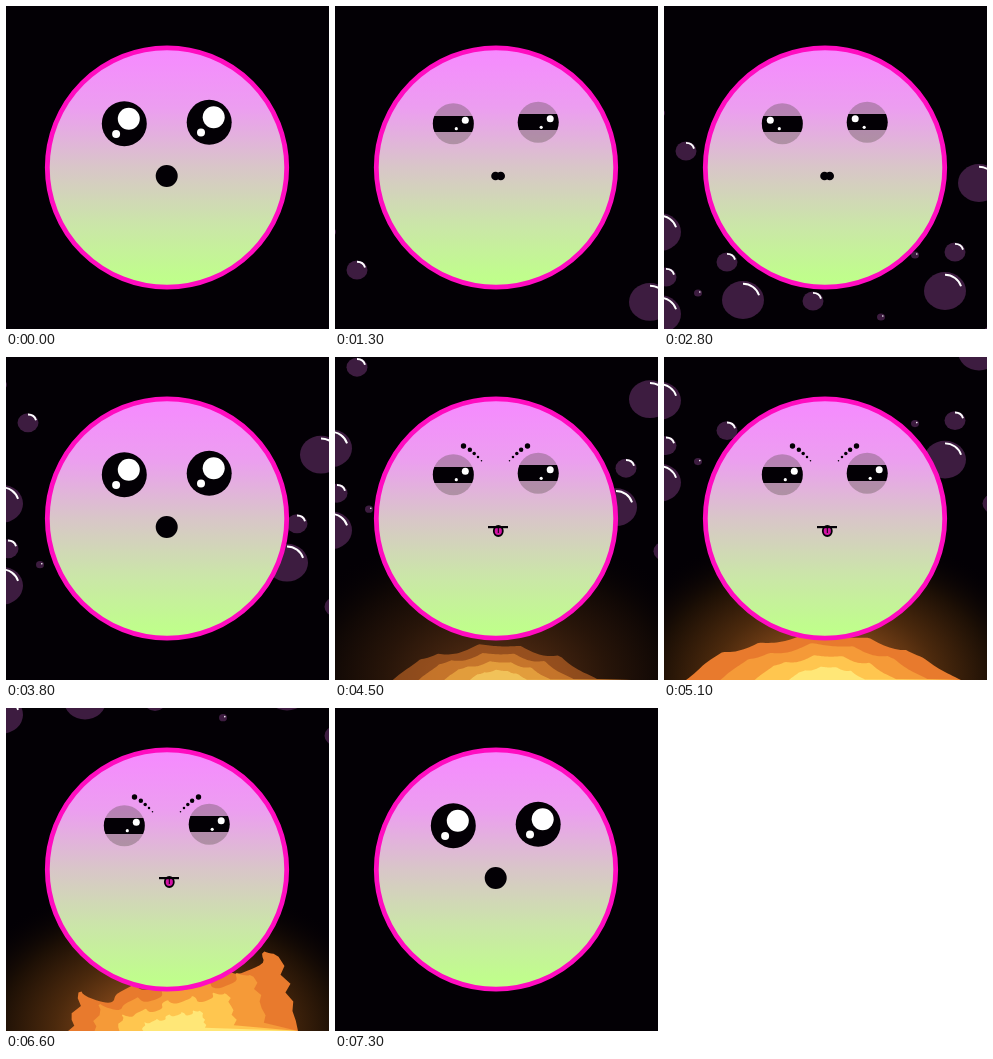
Write an HTML page with a canvas that moves like this. It is 323 px wide and 323 px high and loops after 7.4 s.

```html
<!DOCTYPE html>
<html lang="en">
<head>
<meta charset="utf-8">
<title>Bubbles and fire</title>
<style>
  html, body { margin: 0; width: 100%; height: 100%; overflow: hidden; background: #030005; }
  canvas { display: block; width: 100vmin; height: 100vmin; }
</style>
</head>
<body>
<canvas id="stage" width="323" height="323"></canvas>
<script>
const SIZE = 323, LOOP = 7400, STEP = 100;
const INK = '#030005', PINK = '#ff0cc0', WHITE = '#fff';
const ctx = document.getElementById('stage').getContext('2d');

const RISE = 0.0793; // px per ms
// Bubble centres at 2800 ms, grouped by radius
const bubbleGroups = [
  { r: 21, at: [[315, 177], [-4, 226], [281, 285], [79, 294], [-4, 308]] },
  { r: 10.5, at: [[22, 145], [291, 246], [63, 256], [2, 271], [149, 295], [329, 329]] },
  { r: 4, at: [[-3, 107], [251, 249], [34, 287], [217, 311]] }
];

const clamp = v => Math.max(0, Math.min(1, v));
const mix = (a, b, k) => a + (b - a) * k;

function disc(x, y, r, fill, ry = r) {
  ctx.beginPath();
  ctx.ellipse(x, y, r, ry, 0, 0, Math.PI * 2);
  ctx.fillStyle = fill;
  ctx.fill();
}

function fillStops(gradient, colors) {
  colors.forEach((color, i) => gradient.addColorStop(i / (colors.length - 1), color));
  return gradient;
}

function drawBubble(x, y, r) {
  const ry = r * 0.9;
  disc(x, y, r, '#3d1c40', ry);
  if (r < 5) return disc(x + 1.8, y - 1, 0.8, WHITE);
  ctx.beginPath();
  ctx.ellipse(x, y, r * 0.8, ry * 0.86, 0, -Math.PI / 2, -0.3);
  ctx.strokeStyle = WHITE;
  ctx.lineWidth = 1.9;
  ctx.stroke();
}

function drawBubbles(t) {
  for (const { r, at } of bubbleGroups)
    for (const [x, y] of at) drawBubble(x, y - (t - 2800) * RISE, r);
}

// Flame outline: a low mound that later leans right and grows sharp tongues
function flamePath(t, late, scale) {
  const left = mix(22, 62, late), width = mix(275, 230, late);
  const ramp = mix(5, 12, late), drift = 0.04 * Math.sin((t - 5900) / 120);
  ctx.beginPath();
  ctx.moveTo(left, SIZE);
  for (let u = 0; u <= 1; u += 0.01) {
    const edge = Math.min(1, u * ramp * 1.5, (1 - u) * ramp);
    const tongue = mix(5, 13, late) * (1 - Math.abs(Math.sin(5 * Math.PI * (u - 0.05 + drift))));
    const height = 27 + 60 * late * u ** 3 + 18 * Math.sin(Math.PI * u) ** 4 + tongue;
    const curl = 4 * late * Math.sin(height * 0.3 * edge + t / 150);
    const x = left + width * u + curl;
    ctx.lineTo(mix(165, x, scale), SIZE - height * edge * scale);
  }
  ctx.lineTo(left + width, SIZE);
  ctx.closePath();
}

function drawFire(t) {
  if (t < 4400 || t > 7200) return;
  const power = Math.min(clamp((t - 4200) / 600), clamp((7500 - t) / 900));
  const late = clamp((t - 5300) / 300);

  ctx.save();
  ctx.globalAlpha = power;
  ctx.save();
  ctx.translate(161, SIZE);
  ctx.scale(1.25, 0.85);
  ctx.fillStyle = fillStops(ctx.createRadialGradient(0, 0, 0, 0, 0, 180),
    ['#9a5520', '#84481a', '#4b290d', '#1c0f05', 'rgba(3,0,5,0)']);
  ctx.fillRect(-161, -SIZE, SIZE, SIZE);
  ctx.restore();

  const layers = ['#e87a2d', '#f59a38', '#ffc64f', '#ffe777'];
  layers.forEach((color, i) => {
    flamePath(t + i * 90, late, (1 - i * 0.24) * mix(0.5, 1, power));
    ctx.fillStyle = color;
    ctx.fill();
  });
  ctx.restore();
}

function drawHead() {
  const skin = fillStops(ctx.createLinearGradient(0, 45, 0, 275),
    ['#f68aff', '#ec9ef0', '#d9c5c9', '#cbe5a9', '#bfff8a']);
  disc(161, 161.5, 119.7, skin);
  ctx.strokeStyle = PINK;
  ctx.lineWidth = 4.8;
  ctx.stroke();
}

const eyes = [[118.3, 117.7], [203.2, 116.3]];

function openEyes() {
  for (const [x, y] of eyes) {
    disc(x, y, 22.5, INK);
    disc(x + 4.5, y - 5, 11, WHITE);
    disc(x - 8.2, y + 10.2, 4, WHITE);
  }
}

// side: 1 looks right, -1 looks left
function sleepyEyes(side) {
  for (const [x, y] of eyes) {
    disc(x, y, 20.5, 'rgba(60,60,45,.3)');
    ctx.save();
    ctx.clip();
    ctx.fillStyle = INK;
    ctx.fillRect(x - 21, Math.round(y - 8), 42, 16);
    ctx.restore();
    disc(x + side * 12, y - 3.5, 3.5, WHITE);
    disc(x + side * 3, y + 5, 1.6, WHITE);
  }
}

function smallMouth() {
  for (const x of [160.5, 165.7]) disc(x, 170, 4.3, INK);
}

function drawBrows() {
  for (let i = 0; i < 5; i++) {
    const dx = 18 * (i / 4) ** 0.75;
    for (const x of [128.5 + dx, 192.5 - dx]) disc(x, 89 + 3.7 * i, 2.7 - 0.48 * i, INK);
  }
}

function tongueMouth() {
  disc(163.3, 174, 4.5, '#d314a5', 5);
  ctx.strokeStyle = INK;
  ctx.lineWidth = 1.8;
  ctx.stroke();
  ctx.fillStyle = INK;
  ctx.fillRect(162.8, 171, 1, 5);
  ctx.fillRect(153, 169, 20, 2.2);
}

const moods = {
  surprised() { openEyes(); disc(160.7, 170, 11, INK); },
  lookRight() { sleepyEyes(1); smallMouth(); },
  lookLeft() { sleepyEyes(-1); smallMouth(); },
  cheeky() { sleepyEyes(1); drawBrows(); tongueMouth(); }
};

// Each mood lasts until the given time
const schedule = [
  [900, 'surprised'], [2100, 'lookRight'], [3300, 'lookLeft'],
  [4400, 'surprised'], [6700, 'cheeky'], [LOOP, 'surprised']
];

function render(now) {
  const t = Math.floor(now % LOOP / STEP) * STEP;
  ctx.fillStyle = INK;
  ctx.fillRect(0, 0, SIZE, SIZE);
  drawFire(t);
  drawBubbles(t);
  drawHead();
  const [, mood] = schedule.find(([end]) => t < end);
  moods[mood]();
}

let start;
function tick(now) {
  start ??= now;
  render(now - start);
  requestAnimationFrame(tick);
}
render(0);
requestAnimationFrame(tick);
</script>
</body>
</html>
```
